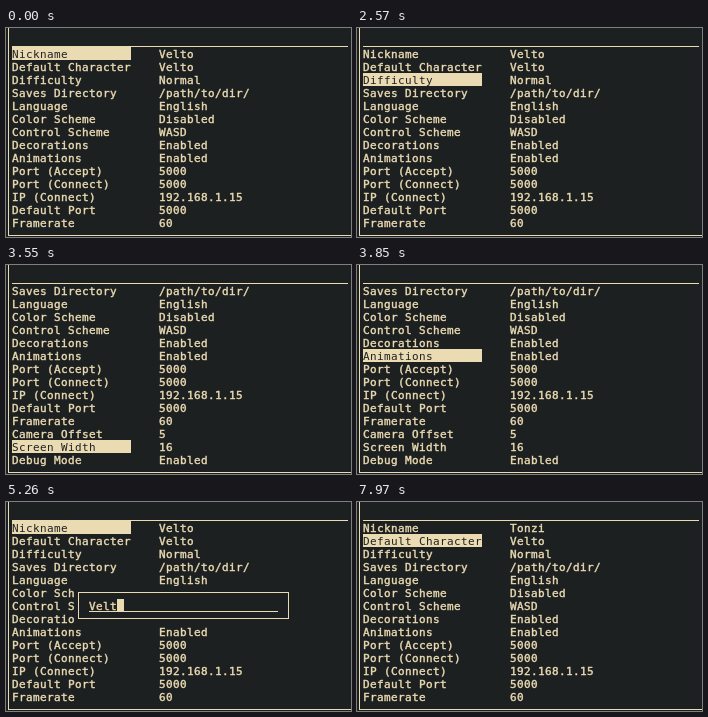
Animation, 345 px wide and 209 px high, one loop 8 s. Source, as an HTML page with a canvas:

```html
<!DOCTYPE html>
<html lang="en">
<head>
<meta charset="utf-8">
<title>Settings menu</title>
<style>
html, body { margin: 0; width: 100%; height: 100%; overflow: hidden; background: #1d2021; }
canvas { display: block; }
</style>
</head>
<body>
<canvas id="stage" width="345" height="209"></canvas>
<script>
const ctx = document.getElementById('stage').getContext('2d');
const BG = '#1d2021', FG = '#ebdbb2';
const LOOP = 8000, CELL = 7, LINE = 13, LEFT = 6, TOP = 19, ROWS = 14;
const OLD_NAME = 'Velto', NEW_NAME = 'Tonzi';

const settings = [
  ['Nickname', OLD_NAME], ['Default Character', OLD_NAME], ['Difficulty', 'Normal'],
  ['Saves Directory', '/path/to/dir/'], ['Language', 'English'], ['Color Scheme', 'Disabled'],
  ['Control Scheme', 'WASD'], ['Decorations', 'Enabled'], ['Animations', 'Enabled'],
  ['Port (Accept)', '5000'], ['Port (Connect)', '5000'], ['IP (Connect)', '192.168.1.15'],
  ['Default Port', '5000'], ['Framerate', '60'], ['Camera Offset', '5'],
  ['Screen Width', '16'], ['Debug Mode', 'Enabled']
];

// [time, selected setting]
const selection = [
  [0, 0], [1410, 1], [1800, 2], [2090, 1], [2570, 2],
  [2780, 3], [2810, 5], [2840, 7], [2870, 9], [2900, 11], [2940, 14], [2980, 16],
  [3550, 15],
  ...Array.from({ length: 8 }, (_, i) => [3760 + 30 * i, 14 - 2 * i]),
  [7970, 1]
];

// [time, text in the input box]
const input = [
  [0, null],
  [4540, OLD_NAME],
  ...[5260, 5520, 5730, 5940, 6110].map((t, i) => [t, OLD_NAME.slice(0, 4 - i)]),
  ...[6320, 6580, 6850, 6970, 7080].map((t, i) => [t, NEW_NAME.slice(0, i + 1)]),
  [7250, null]
];

const until = (steps, t) => steps.filter(([time]) => time <= t).map(step => step[1]);

const colX = col => LEFT + col * CELL;
const rowY = row => TOP + row * LINE;

function rect(x, y, w, h, color = FG) {
  ctx.fillStyle = color;
  ctx.fillRect(x, y, w, h);
}

function print(text, col, row, color = FG) {
  ctx.fillStyle = ctx.strokeStyle = color;
  ctx.lineWidth = 0.4;
  [...text].forEach((ch, i) => {
    const x = colX(col + i), y = rowY(row) + 11;
    ctx.fillText(ch, x, y);
    if (color === FG) ctx.strokeText(ch, x, y);
  });
}

function drawInput(text) {
  rect(colX(9), rowY(5), 31 * CELL, 3 * LINE, BG);
  ctx.strokeStyle = FG;
  ctx.lineWidth = 1;
  ctx.strokeRect(72.5, 90.5, 210, 26);
  rect(colX(11), rowY(6) + 12, 27 * CELL, 1);
  print(text, 11, 6);
  rect(colX(11 + text.length), rowY(6), CELL, LINE);
}

function draw(t) {
  const visited = until(selection, t);
  const selected = visited.at(-1);
  // The list scrolls only as far as needed to keep the selection in view.
  const scroll = visited.reduce((top, i) => Math.min(i, Math.max(top, i - ROWS + 1)), 0);
  const text = until(input, t).at(-1);

  rect(0, 0, 345, 209, BG);
  rect(2, 0, 1, 208);
  rect(2, 207, 343, 1);
  rect(LEFT, 18, 48 * CELL, 1);
  ctx.font = '11px "DejaVu Sans Mono", monospace';

  settings.slice(scroll, scroll + ROWS).forEach(([label, value], row) => {
    const index = scroll + row, active = index === selected;
    if (active) rect(LEFT, rowY(row), 17 * CELL, LINE);
    print(label, 0, row, active ? BG : FG);
    print(index === 0 && t >= 7250 ? NEW_NAME : value, 21, row);
  });
  if (text !== null) drawInput(text);
}

const start = performance.now();
function tick() {
  draw((performance.now() - start) % LOOP);
  requestAnimationFrame(tick);
}
draw(0);
requestAnimationFrame(tick);
</script>
</body>
</html>
```
